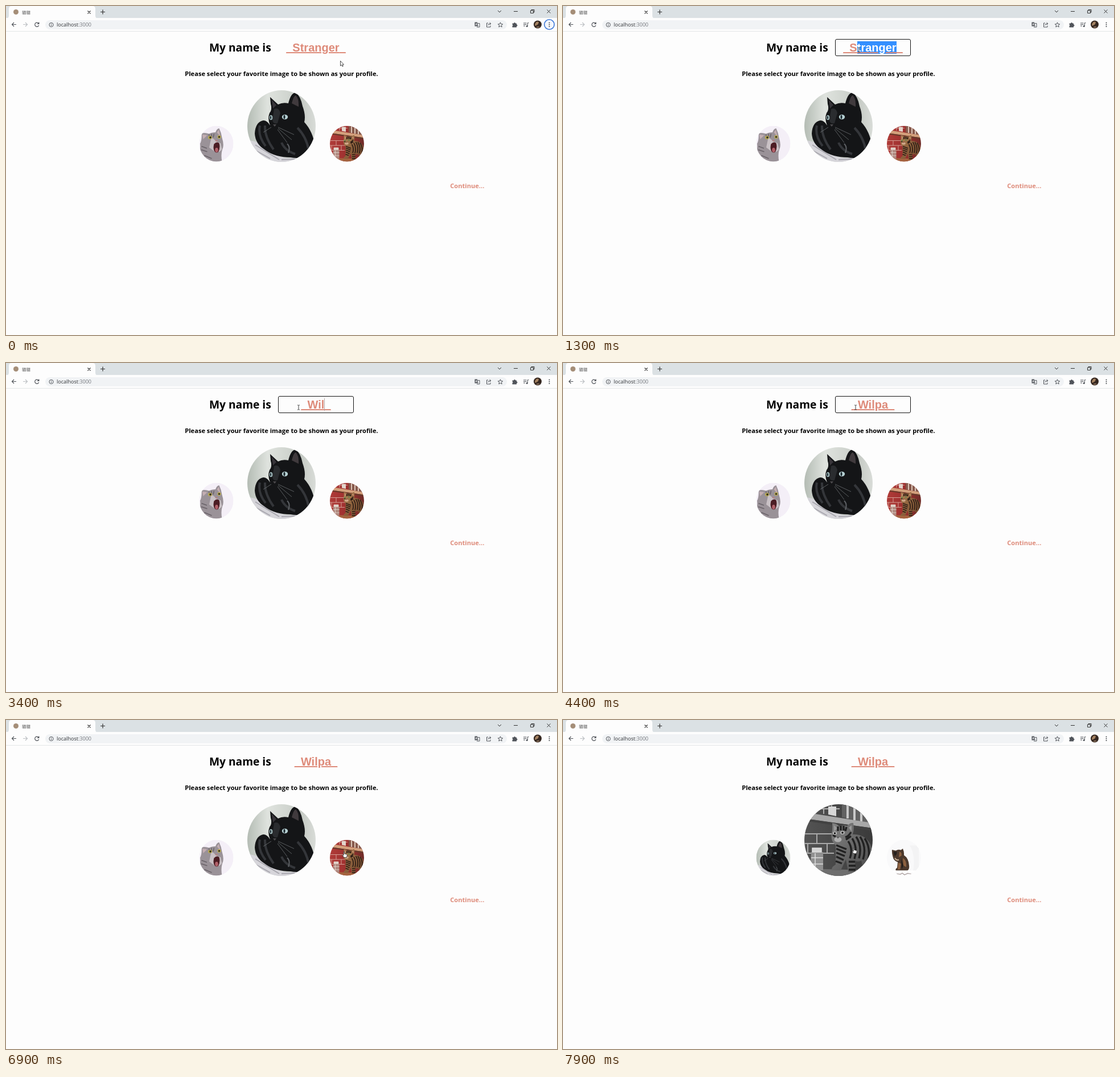
These frames come from a looping animation (968 px wide and 578 px high, 8 s). An HTML page:

```html
<!DOCTYPE html>
<html lang="en">
<head>
<meta charset="utf-8">
<title>Profile picker</title>
<style>
html, body { margin: 0; width: 968px; height: 578px; overflow: hidden; background: #fdfdfd; }
#stage { position: relative; width: 968px; height: 578px; overflow: hidden; }
svg { display: block; position: absolute; left: 0; top: 0; }
text { font-family: "Open Sans", sans-serif; }
.bold { font-weight: 700; }
.icon { fill: none; stroke: #50545a; stroke-width: 1.2; }
.thin { stroke-width: 1; }
#name {
  position: absolute; left: 478px; top: 58px; width: 133px; height: 30px;
  box-sizing: border-box; text-align: center; white-space: pre;
  font: 700 20px/30px "Liberation Sans", Arial, sans-serif;
  color: #de8b7a; text-decoration: underline;
}
#mark { background: #338fff; color: #fff; }
#caret { position: absolute; top: 4px; width: 1px; height: 22px; margin-left: -.5px; background: #b5a5a2; }
#box { position: absolute; left: 478px; top: 58px; width: 133px; height: 30px; box-sizing: border-box; border: 1.5px solid #151515; border-radius: 3px; }
</style>
</head>
<body>
<div id="stage">
<svg width="968" height="578" viewBox="0 0 968 578">
  <defs>
    <clipPath id="oval"><ellipse cx="60" cy="63" rx="60" ry="63"/></clipPath>
    <linearGradient id="wall"><stop offset="0" stop-color="#b4bcb4"/><stop offset=".3" stop-color="#dfe3de"/><stop offset=".8" stop-color="#c6cbc5"/><stop offset="1" stop-color="#d9dcd8"/></linearGradient>
    <linearGradient id="brick"><stop offset="0" stop-color="#b03b38"/><stop offset=".5" stop-color="#9d302f"/><stop offset="1" stop-color="#6f2c28"/></linearGradient>
    <linearGradient id="fur" x2="1" y2="1"><stop offset="0" stop-color="#a87a4e"/><stop offset="1" stop-color="#6d4429"/></linearGradient>

    <symbol id="black" viewBox="0 0 120 126"><g clip-path="url(#oval)">
      <rect width="120" height="126" fill="url(#wall)"/>
      <path d="M0 88Q20 88 42 108T120 112V126H0Z" fill="#d6d5da"/>
      <path d="M4 100L40 120M14 96L56 122M60 122L100 120" stroke="#a9a8af" stroke-width="2"/>
      <path d="M40 12L54 25Q62 21 72 23Q76 6 84 4Q93 8 97 28Q103 44 100 56Q115 72 119 98L120 112Q98 122 76 118Q48 118 30 104Q14 94 13 76Q14 56 28 53Q35 53 40 62Q35 50 39 40Q44 34 41 24Z" fill="#141517"/>
      <path d="M78 23Q81 10 85 9Q91 15 90 29Z" fill="#403a3d"/>
      <path d="M43 17L51 26L45 32Z" fill="#38353a"/>
      <path d="M22 62Q18 80 32 98M31 62Q30 82 46 104M88 66Q104 82 108 106M60 92Q66 106 84 112" fill="none" stroke="#34363a" stroke-width="4"/>
      <path d="M47 33Q55 29 58 40L53 58Q45 60 44 52Z" fill="#2a2c2f"/>
      <ellipse cx="41.5" cy="48" rx="2.8" ry="4.2" fill="#a9c3c5"/>
      <ellipse cx="66" cy="47" rx="5.2" ry="4.2" fill="#b5cfd2"/>
      <ellipse cx="41" cy="48" rx="1.1" ry="3" fill="#18242a"/>
      <ellipse cx="65" cy="47" rx="1.5" ry="3.4" fill="#18242a"/>
      <path d="M45 60h6l-3 4Z" fill="#4b494c"/>
      <path d="M54 65L82 78M54 67L78 87M53 69L70 92M42 65L28 74" fill="none" stroke="#888d91" stroke-width=".6"/>
      <path d="M70 94Q76 100 72 110" fill="none" stroke="#5d6064" stroke-width="2"/>
    </g></symbol>

    <symbol id="tabby" viewBox="0 0 120 126"><g clip-path="url(#oval)">
      <rect width="120" height="126" fill="url(#brick)"/>
      <path d="M0 52H48M0 69H56M0 86H52M22 52V69M6 69V86M40 69V86M24 86V103" stroke="#d59e94" stroke-width="2"/>
      <path d="M30 8H62M48 0V8M34 8V17" stroke="#d8a49c" stroke-width="2"/>
      <path d="M42 4H56V21L42 18Z" fill="#e2d5cc"/>
      <path d="M66 0H120V34L66 23Z" fill="#86594c"/>
      <path d="M76 0V25M88 2V28M100 5V30" fill="none" stroke="#dcc5b7" stroke-width="4"/>
      <path d="M0 14L120 33V42L0 25Z" fill="#d3a07c"/>
      <path d="M0 25L120 42V47L0 29Z" fill="#67392a"/>
      <path d="M0 113L120 116V126H0Z" fill="#a5633f"/>
      <path d="M12 84H33V116H10Z" fill="#b08a80"/>
      <path d="M14 77H30V84H14ZM12 94H33M12 105H33M19 86V114" fill="#dfd2c8" stroke="#e8dcd5" stroke-width="1.5"/>
      <path d="M49 33Q58 34 61 39Q69 36 75 38Q81 32 86 33Q88 44 85 53Q106 52 116 70Q124 92 116 117H104L100 99Q94 102 89 99L90 119H77L73 97L64 116H49Q46 111 55 106L55 72Q46 64 48 53Q50 43 49 33Z" fill="url(#fur)"/>
      <path d="M52 37L58 42L52 48ZM83 37L78 41L83 48Z" fill="#c99073"/>
      <path d="M59 39V47M64 38V46M69 38V46M74 40L72 47M82 49Q78 56 72 58M82 56L73 62M56 72L74 79M56 78L73 85M56 85L71 91M56 92L69 98M55 100L66 104M77 65Q86 78 80 95M84 60Q94 76 88 96M91 57Q102 74 96 95M98 57Q110 76 103 97M106 60Q118 78 111 103M78 101H89M78 108H90M78 115H90M105 108H116M50 54L55 57" fill="none" stroke="#2e1e16" stroke-width="3.4"/>
      <ellipse cx="53.500" cy="51" rx="3.6" ry="3" fill="#b3bf73"/>
      <ellipse cx="67" cy="50" rx="3.8" ry="3.1" fill="#b3bf73"/>
      <circle cx="53.500" cy="51" r="1.7" fill="#17170f"/><circle cx="67" cy="50" r="1.8" fill="#17170f"/>
      <ellipse cx="59" cy="62" rx="6.500" ry="4.500" fill="#d0a888"/>
      <path d="M56 57h6l-3 3.500Z" fill="#884f43"/>
    </g></symbol>

    <symbol id="grey" viewBox="0 0 120 126"><g clip-path="url(#oval)">
      <rect width="120" height="126" fill="#f4eff7"/>
      <path d="M8 26Q23 23 34 28Q45 22 57 23Q62 9 70 9Q78 25 80 42Q88 66 82 81Q75 99 80 126H8L0 96Q5 80 3 63Q10 50 8 26Z" fill="#9a9298"/>
      <path d="M11 31L28 33L14 47ZM62 23L69 14L75 39Z" fill="#c4aeb3"/>
      <path d="M34 30L36 42M43 28V41M52 28L49 41M8 72L27 79M7 84L28 91M18 104L44 115" fill="none" stroke="#696268" stroke-width="3"/>
      <path d="M42 43Q52 44 57 54L75 61L80 82Q68 100 52 89L35 76Z" fill="#c9c1c5"/>
      <ellipse cx="38" cy="41" rx="7" ry="6" fill="#b9a94a"/><ellipse cx="70" cy="39" rx="6" ry="6" fill="#b9a94a"/>
      <circle cx="39" cy="41" r="3.4" fill="#242322"/><circle cx="70" cy="39" r="3.2" fill="#242322"/>
      <path d="M55 50H66L61 56Z" fill="#b98486"/>
      <path d="M52 64Q61 54 70 61Q75 77 67 92Q58 98 52 87Q48 76 52 64Z" fill="#4c1d24"/>
      <ellipse cx="61" cy="85" rx="5.500" ry="8" fill="#b3616a"/>
    </g></symbol>

    <symbol id="kitten" viewBox="0 0 120 126"><g clip-path="url(#oval)">
      <rect width="120" height="126" fill="#f9f9fa"/>
      <path d="M80 20Q102 54 92 110H112V20Z" fill="#f3f3f4"/>
      <path d="M18 35L31 38Q40 32 49 36L56 31Q61 42 60 54Q76 64 78 90Q80 104 72 108H32Q28 103 36 98L38 78Q24 74 21 60Q17 47 18 35Z" fill="#4b382c"/>
      <path d="M44 42Q54 44 51 56L42 61ZM56 64Q70 72 68 96L58 90ZM40 80L50 84L46 104H38Z" fill="#8d6140"/>
      <path d="M23 42L35 42Q36 52 27 58ZM50 66L58 90L52 104" fill="#241e1b"/>
      <path d="M28 64Q34 74 42 70" fill="none" stroke="#c6ac92" stroke-width="4"/>
      <path d="M17 108H103V115H17Z" fill="#fff"/>
      <path d="M34 119L47 121L54 117L62 123L73 118L86 120" fill="none" stroke="#a99c9a" stroke-width="2.5"/>
    </g></symbol>

    <path id="arrow" d="M-.5-3.5V5.2L1.5 3.4L2.9 6.3L4.3 5.7L3 2.9H5.5Z" fill="#fff" stroke="#222" stroke-width=".8"/>
    <path id="beam" d="M-2-4H-.5L0-3.5L.5-4H2M0-3.5V3.5M-2 4H-.5L0 3.5L.5 4H2" fill="none" stroke="#333" stroke-width=".9"/>
    <path id="hand" d="M-1.8 1V-4.3Q-1-5.6-.2-4.3V-.9L3.2-.2Q4.5.2 4.3 1.6L3.5 5.5H-1.1L-4 1.8Q-3.8.2-1.8 1.7Z" fill="#fff" stroke="#222" stroke-width=".8"/>
  </defs>

  <rect width="968" height="578" fill="#fdfdfd"/>
  <rect width="968" height="22" fill="#dbe1e4"/>
  <path d="M0 22Q5 22 5 17V5Q5 0 10 0H152Q157 0 157 5V17Q157 22 162 22Z" fill="#fdfdfd"/>
  <rect y="21" width="968" height="23" fill="#fdfdfd"/>
  <path d="M0 44.5H968" stroke="#e4e6e7"/>
  <circle cx="17.5" cy="10.5" r="4.5" fill="#a58e78"/>
  <text x="28" y="13.7" font-size="7.4" fill="#555" style="font-family:'Noto Sans CJK TC','Noto Sans CJK',sans-serif">貓貓</text>
  <g class="icon">
    <g stroke="#333">
      <path d="M143.5 8.5L148.5 13.5M148.5 8.5L143.5 13.5M166 10.5H174M170 6.5V14.5"/>
      <path class="thin" d="M864 8L867 11L870 8M892 9.5H899M950.5 6.5L956.5 12.5M956.5 6.5L950.5 12.5"/>
      <path class="thin" d="M921.5 8H926.5V12.5H921.5ZM923 8V6.5H928V11H926.5"/>
    </g>
    <path d="M18 32.5H10.5M14 29L10.5 32.5L14 36"/>
    <path d="M30 32.5H37.5M34 29L37.5 32.5L34 36" stroke="#bcbfc3"/>
    <path d="M57.3 30.6A3.6 3.6 0 1 0 57.7 34M57.8 28.5V31.3H55"/>
  </g>
  <rect x="69" y="25" width="811" height="16" rx="8" fill="#f1f3f5"/>
  <g class="icon thin">
    <circle cx="79.5" cy="33" r="3.6"/>
    <path d="M79.5 32.5V35M79.5 30.5V31.5"/>
    <path d="M829 30.5H832V37H827"/>
    <path d="M847 30H844.5V37H851V34.5M846.5 34Q847 31 851.5 31M849.5 29L852 31L849.5 33"/>
    <path d="M868.5 28.8L869.7 31.7L872.8 31.9L870.4 33.9L871.2 37L868.5 35.3L865.8 37L866.6 33.9L864.2 31.9L867.3 31.7Z"/>
    <path d="M909 30H914.5M909 32.5H914.5M909 35H912M916.3 35.5V29.7H918.5"/>
  </g>
  <g fill="#50545a">
    <path d="M823.5 28.5H828L829.5 35.5H823.500Z"/>
    <circle cx="915.2" cy="35.5" r="1.5"/>
    <path d="M889.5 30.5H892A1.5 1.5 0 0 1 895 30.5H897V32.5A1.5 1.5 0 0 1 897 35.5V37.5H889.5V35A1.3 1.3 0 0 0 889.5 32.5Z"/>
  </g>
  <text class="bold" x="826.3" y="34" font-size="5" fill="#fff" text-anchor="middle">A</text>
  <circle cx="934" cy="32.5" r="7" fill="#33261f"/>
  <path d="M929 33Q931 26 936 28L935 32L930 35Z" fill="#a58362"/>
  <path d="M931 38Q934 33 938 37Q935 40 931 38Z" fill="#76604e"/>
  <circle id="ring" cx="954.5" cy="32.5" r="8.7" fill="#f3f6fc" stroke="#3d79d8" stroke-width="1.6"/>
  <g fill="#45494e"><circle cx="954.5" cy="29.5" r="1"/><circle cx="954.5" cy="32.8" r="1"/><circle cx="954.5" cy="36.1" r="1"/></g>
  <text x="89" y="36.3" font-size="9.05" fill="#303236">localhost<tspan fill="#73777c">:3000</tspan></text>

  <text class="bold" x="357" y="80" font-size="19.2">My name is</text>
  <text class="bold" x="484" y="122.5" font-size="11.12" text-anchor="middle">Please select your favorite image to be shown as your profile.</text>
  <text class="bold" x="780.3" y="320" font-size="11.1" fill="#de8b7a">Continue...</text>

  <use class="pic" x="339.5" y="210.5" width="60" height="63"/>
  <use class="pic" x="424" y="148" width="120" height="126"/>
  <use class="pic" x="569" y="210.5" width="60" height="63"/>
</svg>
<div id="name"><span id="head"></span><span id="mark"></span><i id="caret"></i><span id="tail">_</span></div>
<div id="box"></div>
<svg width="968" height="578" viewBox="0 0 968 578"><use id="cursor"/></svg>
</div>
<script>
const LOOP = 8000, FOCUS = 600, DRAG_END = 1750, CLEAR = 2300, BLUR = 6800, SWAP = 7100;
const OLD = "Stranger", NEW = "Wilpa";
const KEYS = [2900, 3150, 3400, 3600, 3800];
// time, x, y
const PATH = [
  [0, 588, 100], [100, 588, 100], [500, 587, 78], [FOCUS, 587, 78],
  [1300, 520, 77], [1600, 507, 77], [1900, 507, 77], [2200, 514, 78],
  [4700, 514, 78], [5500, 595, 236], [7200, 595, 236], [7700, 514, 230], [LOOP, 511, 229]
];
const BEFORE = ["grey", "black", "tabby"], AFTER = ["black", "tabby", "kitten"];
const OVALS = [[369.5, 242, 30], [484, 211, 60], [599, 242, 30]];
const CHOSEN = 1;

const $ = id => document.getElementById(id);
const pics = [...document.querySelectorAll(".pic")];
const show = (el, on) => { el.style.visibility = on ? "visible" : "hidden"; };

const pen = document.createElement("canvas").getContext("2d");
pen.font = '700 20px "Liberation Sans", Arial, sans-serif';
const width = s => pen.measureText(s).width;
const left = 544.5 - width(`_${OLD}_`) / 2;
const edges = [...OLD, ""].map((_, i) => left + width("_" + OLD.slice(0, i)));

function pointer(t) {
  const i = PATH.findIndex(p => p[0] > t);
  const [t0, x0, y0] = PATH[i - 1], [t1, x1, y1] = PATH[i];
  const k = (t - t0) / (t1 - t0);
  return [x0 + (x1 - x0) * k, y0 + (y1 - y0) * k];
}

function selectFrom(t, x) {
  if (t < FOCUS) return OLD.length;
  if (t >= DRAG_END) return 0;
  return edges.reduce((best, e, i) => Math.abs(e - x) < Math.abs(edges[best] - x) ? i : best, 0);
}

function drawName(t, x) {
  const typing = t >= CLEAR;
  const typed = KEYS.filter(k => k <= t).length;
  const from = typing ? typed : selectFrom(t, x);
  $("head").textContent = "_" + (typing ? NEW : OLD).slice(0, from);
  $("mark").textContent = typing ? "" : OLD.slice(from);
  const last = typed ? KEYS[typed - 1] : CLEAR;
  show($("caret"), typing && t < BLUR && Math.floor((t - last) / 500) % 2 === 0);
}

function draw(t) {
  const [x, y] = pointer(t);
  drawName(t, x);
  show($("ring"), t < FOCUS);
  show($("box"), t >= FOCUS && t < BLUR);

  const over = OVALS.findIndex(([cx, cy, r]) => Math.hypot((x - cx) / r, (y - cy) / (r * 1.05)) < 1);
  const shown = t < SWAP ? BEFORE : AFTER;
  pics.forEach((pic, i) => pic.setAttribute("href", "#" + shown[i]));
  pics[CHOSEN].style.filter = over === CHOSEN ? "grayscale(1)" : "none";

  const inField = x > 478 && x < 611 && y > 58 && y < 88;
  $("cursor").setAttribute("href", over >= 0 ? "#hand" : inField ? "#beam" : "#arrow");
  $("cursor").setAttribute("transform", `translate(${x} ${y})`);
}

function tick() {
  draw(performance.now() % LOOP);
  requestAnimationFrame(tick);
}
tick();
</script>
</body>
</html>
```
